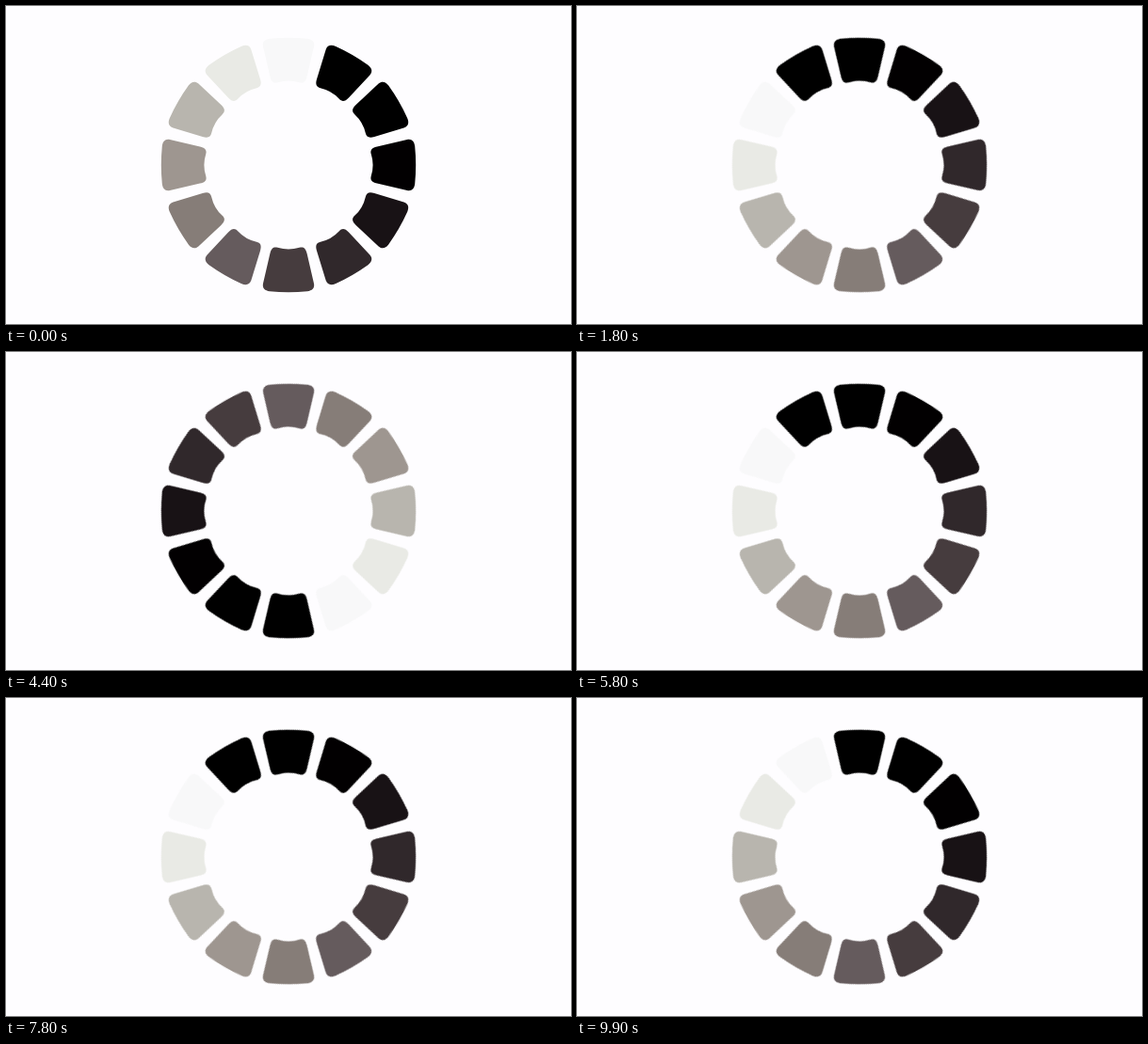
Animation, 600 px wide and 338 px high, one loop 10000 ms. Source, as an HTML page:

```html
<!DOCTYPE html>
<html lang="en">
<head>
<meta charset="utf-8">
<title>Loading ring</title>
<style>
  html, body { margin: 0; width: 100%; height: 100%; overflow: hidden; background: #fefdff; }
  svg { display: block; width: 600px; height: 338px; }

  /* Twelve positions played at ten steps per second, so two are skipped. */
  .ring { transform-origin: 0 0; animation: turn 1s step-end infinite; }
  @keyframes turn {
    0%   { transform: rotate(0deg); }
    10%  { transform: rotate(30deg); }
    20%  { transform: rotate(60deg); }
    30%  { transform: rotate(120deg); }
    40%  { transform: rotate(150deg); }
    50%  { transform: rotate(180deg); }
    60%  { transform: rotate(210deg); }
    70%  { transform: rotate(240deg); }
    80%  { transform: rotate(300deg); }
    90%  { transform: rotate(330deg); }
    100% { transform: rotate(360deg); }
  }
</style>
</head>
<body>
<svg viewBox="0 0 600 338">
  <defs>
    <path id="seg" d="M-20-134.2Q0-136.2 20-134.2C25-133.6 28-131 27-126L19.6-94C18.2-88 15.5-86.6 11.5-87.8Q0-91.4-11.5-87.8C-15.5-86.6-18.2-88-19.6-94L-27-126C-28-131-25-133.6-20-134.2Z"/>
  </defs>
  <g transform="translate(300 169)">
    <g class="ring">
      <use href="#seg" fill="#f8f8f9"/>
      <use href="#seg" fill="#000" transform="rotate(30)"/>
      <use href="#seg" fill="#000" transform="rotate(60)"/>
      <use href="#seg" fill="#020001" transform="rotate(90)"/>
      <use href="#seg" fill="#181215" transform="rotate(120)"/>
      <use href="#seg" fill="#30282b" transform="rotate(150)"/>
      <use href="#seg" fill="#463c3e" transform="rotate(180)"/>
      <use href="#seg" fill="#655b5d" transform="rotate(210)"/>
      <use href="#seg" fill="#867d78" transform="rotate(240)"/>
      <use href="#seg" fill="#9e9690" transform="rotate(270)"/>
      <use href="#seg" fill="#b8b5ae" transform="rotate(300)"/>
      <use href="#seg" fill="#e9eae5" transform="rotate(330)"/>
    </g>
  </g>
</svg>
</body>
</html>
```
